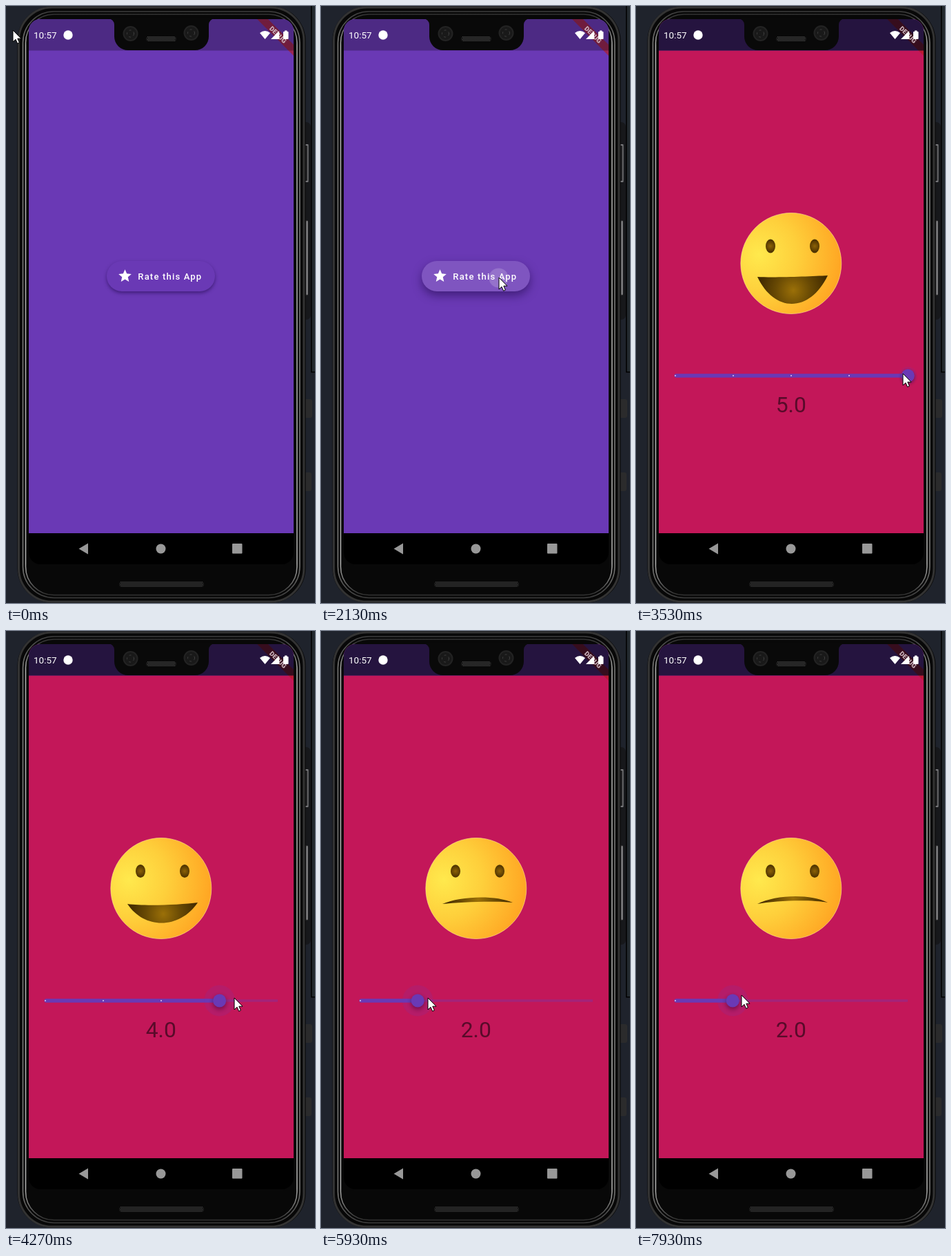
An HTML page with a canvas that plays this animation: 448 by 864 pixels, repeating every 8000 ms.

```html
<!DOCTYPE html>
<html lang="en">
<head>
<meta charset="utf-8">
<title>Rating slider</title>
<style>
html, body { margin: 0; width: 100%; height: 100%; overflow: hidden; background: #1f232c; }
canvas { display: block; width: 448px; height: 864px; }
</style>
</head>
<body>
<canvas id="stage" width="448" height="864"></canvas>
<script>
const ctx = document.getElementById('stage').getContext('2d');
const LOOP = 8000, FPS = 15;
const PURPLE = '#6a39b5', PINK = '#c31759';
const SANS = 'Roboto, sans-serif';

// Cursor tip: time, x, y
const CURSOR = [
  [270, 9.5, 35], [670, 270, 355], [1000, 270, 355], [1240, 283, 374], [1470, 258, 393],
  [2600, 258, 393], [2950, 387, 544], [3300, 387, 544], [3500, 388, 533], [3600, 386, 531],
  [4270, 331, 531], [5270, 240, 531], [6070, 137, 531], [6560, 44, 530], [6950, 44, 530],
  [7750, 153, 527]
];

// Rating changes: time, rating
const RATINGS = [[0, 5], [3990, 4], [4950, 3], [5730, 2], [6270, 1], [7400, 2]];

// Per rating: mouth left x, left y, right x, right y, upper mid y, lower mid y, eye rx, eye ry
const POSES = {
  1: [177, 402, 276, 400, 382, 392, 7, 9.5],
  2: [176, 395, 278, 393, 384, 390.5, 7, 9.5],
  3: [176, 395, 278, 393, 400, 406, 7.3, 7.5],
  4: [176, 395, 278, 393, 396.5, 422.5, 7, 9.5],
  5: [176, 392, 278, 390, 392, 431, 7, 10]
};

const clamp = x => Math.max(0, Math.min(1, x));
const mix = (a, b, p) => a + (b - a) * p;
const ease = p => p * p * (3 - 2 * p);

function keyed(keys, t) {
  const i = keys.findIndex(k => k[0] > t);
  if (i === 0) return keys[0].slice(1);
  if (i < 0) return keys[keys.length - 1].slice(1);
  const a = keys[i - 1], b = keys[i], p = (t - a[0]) / (b[0] - a[0]);
  return [mix(a[1], b[1], p), mix(a[2], b[2], p)];
}

function fillBox(x, y, w, h, r, color) {
  ctx.beginPath();
  ctx.roundRect(x, y, w, h, r);
  ctx.fillStyle = color;
  ctx.fill();
}

// Outline of the phone, inset evenly from its left and right sides
function ring(left, top, bottom, r, color, width) {
  ctx.beginPath();
  ctx.roundRect(left, top, 2 * (225.2 - left), bottom - top, r);
  ctx.strokeStyle = color;
  ctx.lineWidth = width;
  ctx.stroke();
}

function ellipse(x, y, rx, ry, color) {
  ctx.beginPath();
  ctx.ellipse(x, y, rx, ry, 0, 0, Math.PI * 2);
  ctx.fillStyle = color;
  ctx.fill();
}

const circle = (x, y, r, color) => ellipse(x, y, r, r, color);

function polygon(points, color) {
  ctx.beginPath();
  points.forEach(([x, y]) => ctx.lineTo(x, y));
  ctx.closePath();
  ctx.fillStyle = color;
  ctx.fill();
}

function text(str, x, y, font, color, align = 'left', spacing = 0) {
  ctx.font = font + ' ' + SANS;
  ctx.textAlign = align;
  ctx.letterSpacing = spacing + 'px';
  ctx.fillStyle = color;
  ctx.fillText(str, x, y);
  ctx.letterSpacing = '0px';
}

function shadow(blur, dy, color) {
  ctx.shadowBlur = blur;
  ctx.shadowOffsetY = dy;
  ctx.shadowColor = color;
}

function addStops(gradient, stops) {
  stops.forEach(([at, color]) => gradient.addColorStop(at, color));
  return gradient;
}

const radial = (x, y, r, stops) => addStops(ctx.createRadialGradient(x, y, 0, x, y, r), stops);

function drawGrille(x, y, w, h, color) {
  fillBox(x, y, w, h, h / 2, '#1b1b1b');
  ctx.fillStyle = color;
  for (let row = 0; row < h; row += 2)
    for (let i = 2 + row % 4 / 2; i < w - 2; i += 2) ctx.fillRect(x + i, y + row, 1, 1);
}

function drawBody() {
  ctx.fillStyle = '#1f232c';
  ctx.fillRect(0, 0, 448, 864);
  ctx.fillStyle = '#22292e';
  ctx.fillRect(443, 0, 5, 530);
  ctx.fillStyle = '#000';
  ctx.fillRect(442, 0, 1.5, 530);
  ctx.fillRect(442, 529, 6, 1.5);

  fillBox(426, 168, 16, 286, 7, '#17181b');
  fillBox(430, 200, 8.5, 55, 1, '#77777a');
  fillBox(430, 202, 7, 51, 1, '#242426');
  fillBox(430, 310, 8, 109, 1, '#2b2b2d');
  fillBox(435.5, 311, 2, 107, 1, '#8f8f91');
  fillBox(428, 569, 16, 27, 3, '#2b2b2c');
  fillBox(428, 675, 15, 27, 3, '#2b2b2c');

  fillBox(16.5, 0.5, 418, 863, 50, '#080808');
  const metal = (edge, side) => addStops(ctx.createLinearGradient(0, 6, 0, 858),
    [[0, edge], [0.06, side], [0.94, side], [1, edge]]);
  ring(18.5, 2, 862, 48, '#333333', 3);
  ring(24.5, 8, 856.5, 45, metal('#3a3a3a', '#7d7d7b'), 1.5);
  ring(28.5, 12, 852.5, 41, metal('#222222', '#b4b4b2'), 1.5);
  drawGrille(164, 833, 123, 8, '#3b3b3b');
}

function drawNotch() {
  ctx.beginPath();
  ctx.moveTo(148, 18);
  ctx.arcTo(157, 18, 157, 28, 9);
  ctx.arcTo(157, 64, 180, 64, 20);
  ctx.arcTo(294, 64, 294, 40, 20);
  ctx.arcTo(294, 18, 303, 18, 9);
  ctx.lineTo(303, 18);
  ctx.fillStyle = '#090909';
  ctx.fill();
  for (const [x, y] of [[180.5, 40], [268.5, 39]]) {
    circle(x, y, 11, '#232323');
    circle(x, y, 9, '#191919');
    ctx.strokeStyle = '#414141';
    ctx.lineWidth = 1;
    ctx.setLineDash([3, 4]);
    ctx.beginPath();
    ctx.arc(x, y, 5, 0, Math.PI * 2);
    ctx.stroke();
    ctx.setLineDash([]);
  }
  drawGrille(203, 44, 44, 7, '#484848');
}

function inCorner(draw) {
  ctx.save();
  ctx.translate(417, 19);
  ctx.rotate(Math.PI / 4);
  draw();
  ctx.restore();
}

function drawTopBar(shade) {
  ctx.fillStyle = PURPLE;
  ctx.fillRect(33, 19, 384, 45.5);
  inCorner(() => {
    ctx.fillStyle = 'rgba(183,28,28,.63)';
    ctx.fillRect(-40, 26.2, 80, 11.2);
  });
  ctx.fillStyle = `rgba(0,0,0,${shade})`;
  ctx.fillRect(33, 19, 384, 45.5);
  inCorner(() => text('DEBUG', 0, 35.2, '900 9.5px', '#cdb6bf', 'center'));
}

function drawStatusIcons() {
  text('10:57', 40, 46.7, '13.5px', '#fff');
  circle(90, 42, 6.7, '#fff');
  ctx.beginPath();
  ctx.moveTo(375.5, 48);
  ctx.lineTo(368, 39);
  ctx.quadraticCurveTo(375.5, 33, 383, 39);
  ctx.closePath();
  ctx.fillStyle = '#fff';
  ctx.fill();
  polygon([[384, 48], [396, 36], [396, 48]], '#fff');
  fillBox(402, 37, 7.5, 11, 1, '#fff');
  ctx.fillRect(404, 35.5, 3.5, 2);
}

function drawNavigation() {
  ctx.fillStyle = '#000';
  ctx.fillRect(33, 763, 384, 46);
  polygon([[105.5, 785.5], [119, 777.5], [119, 793.5]], '#989898');
  circle(224.5, 785.5, 7, '#989898');
  fillBox(328, 778, 14.5, 14.5, 1, '#989898');
}

function drawHome(t) {
  ctx.fillStyle = PURPLE;
  ctx.fillRect(33, 19, 384, 744);
  const pressed = clamp((t - 1960) / 130);
  ctx.save();
  shadow(mix(5, 13, pressed), mix(2.5, 6, pressed), 'rgba(25,5,65,.5)');
  fillBox(146, 369, 157, 44, 22, PURPLE);
  ctx.restore();
  if (pressed) {
    ctx.save();
    ctx.beginPath();
    ctx.roundRect(146, 369, 157, 44, 22);
    ctx.clip();
    ctx.fillStyle = `rgba(255,255,255,${0.14 * pressed})`;
    ctx.fillRect(146, 369, 157, 44);
    circle(257.5, 393.5, 4 + (t - 1990) * 0.07, 'rgba(255,255,255,.17)');
    ctx.restore();
  }
  ctx.save();
  ctx.translate(161.3, 379.3);
  ctx.scale(0.934, 0.934);
  ctx.fillStyle = '#fff';
  ctx.fill(new Path2D('M12 17.27L18.18 21l-1.64-7.03L22 9.24l-7.19-.61L12 2 9.19 8.63 2 9.24l5.46 4.73L5.82 21z'));
  ctx.restore();
  text('Rate this App', 191.3, 395.7, '500 13.07px', '#fff', 'left', 1.17);
}

function ratingAt(t) {
  let i = RATINGS.length - 1;
  while (RATINGS[i][0] > t) i--;
  const [since, now] = RATINGS[i];
  return { now, before: RATINGS[Math.max(0, i - 1)][1], age: t - since };
}

function drawMouth(lx, ly, rx, ry, top, bottom) {
  const inset = (rx - lx) * 0.25, ends = (ly + ry) / 2;
  const lift = mid => (mid - ends) * 4 / 3;
  const up = lift(top), down = lift(bottom);
  ctx.beginPath();
  ctx.moveTo(lx, ly);
  ctx.bezierCurveTo(lx + inset, ly + up, rx - inset, ry + up, rx, ry);
  ctx.bezierCurveTo(rx - inset, ry + down, lx + inset, ly + down, lx, ly);
  ctx.fillStyle = radial(228, (top + bottom) / 2, 50, [[0, '#9b7008'], [0.5, '#694a04'], [1, '#412a00']]);
  ctx.fill();
}

function drawFace(rating) {
  const p = ease(clamp((rating.age + 40) / 300));
  const from = POSES[rating.before];
  const pose = POSES[rating.now].map((v, i) => mix(from[i], v, p));
  const [eyeX, eyeY] = pose.slice(6);
  circle(224.8, 372.5, 73, radial(178, 360, 125, [[0, '#ffe94d'], [0.45, '#fecf3b'], [1, '#ffa321']]));
  ctx.strokeStyle = 'rgba(255,235,150,.75)';
  ctx.lineWidth = 0.8;
  ctx.stroke();
  for (const x of [195, 259])
    ellipse(x, 347.5, eyeX, eyeY, radial(x, 347.5, 9, [[0, '#8c6207'], [1, '#4a3000']]));
  drawMouth(...pose);
}

function drawSlider(t, rating) {
  const p = ease(clamp((rating.age + 30) / 90));
  const x = 55.5 + 84.7 * (mix(rating.before, rating.now, p) - 1);
  const held = clamp((t - 3460) / 130);
  ctx.fillStyle = 'rgba(106,57,181,.34)';
  ctx.fillRect(x, 533.2, 394 - x, 3.6);
  fillBox(55.5, 532.2, x - 55.5, 5.6, 2.8, PURPLE);
  for (let i = 0; i < 5; i++) {
    const tick = 57 + 84 * i;
    if (tick < x - 10) circle(tick, 535, 1, '#d9c9f1');
  }
  if (held) circle(x, 535, 22.4 * held, 'rgba(106,57,181,.16)');
  ctx.save();
  shadow(mix(2, 7, held), mix(1, 3, held), 'rgba(40,0,40,.5)');
  circle(x, 535, 9.5, PURPLE);
  ctx.restore();
  text(rating.now.toFixed(1), 224.7, 588, '31.8px', '#590b2a', 'center');
}

function drawRatingPage(t) {
  const rating = ratingAt(t);
  ctx.fillStyle = PINK;
  ctx.fillRect(33, 19, 384, 744);
  if (t > 3180) drawFace(rating);
  drawSlider(t, rating);
}

function drawCursor(x, y) {
  ctx.save();
  ctx.translate(Math.round(x), Math.round(y));
  polygon([[0, 0], [0, 17], [4, 13.3], [6.6, 19.3], [9.4, 18], [6.8, 12.2], [12, 12.2]], '#fff');
  ctx.strokeStyle = '#000';
  ctx.lineWidth = 1;
  ctx.stroke();
  ctx.restore();
}

function render(t) {
  const opened = ease(clamp((t - 2135) / 130));
  drawBody();
  ctx.save();
  ctx.beginPath();
  ctx.roundRect(33, 19, 384, 789, 17);
  ctx.clip();
  if (opened < 1) drawHome(t);
  if (opened > 0) {
    ctx.save();
    ctx.globalAlpha = opened;
    ctx.translate(0, 100 * (1 - opened));
    drawRatingPage(t);
    ctx.restore();
  }
  drawTopBar(mix(0.27, 0.65, opened));
  drawStatusIcons();
  drawNavigation();
  ctx.restore();
  drawNotch();
  drawCursor(...keyed(CURSOR, t));
}

function tick() {
  const t = performance.now() % LOOP;
  render(Math.floor((t + 4) * FPS / 1000) * 1000 / FPS);
  requestAnimationFrame(tick);
}
tick();
</script>
</body>
</html>
```
